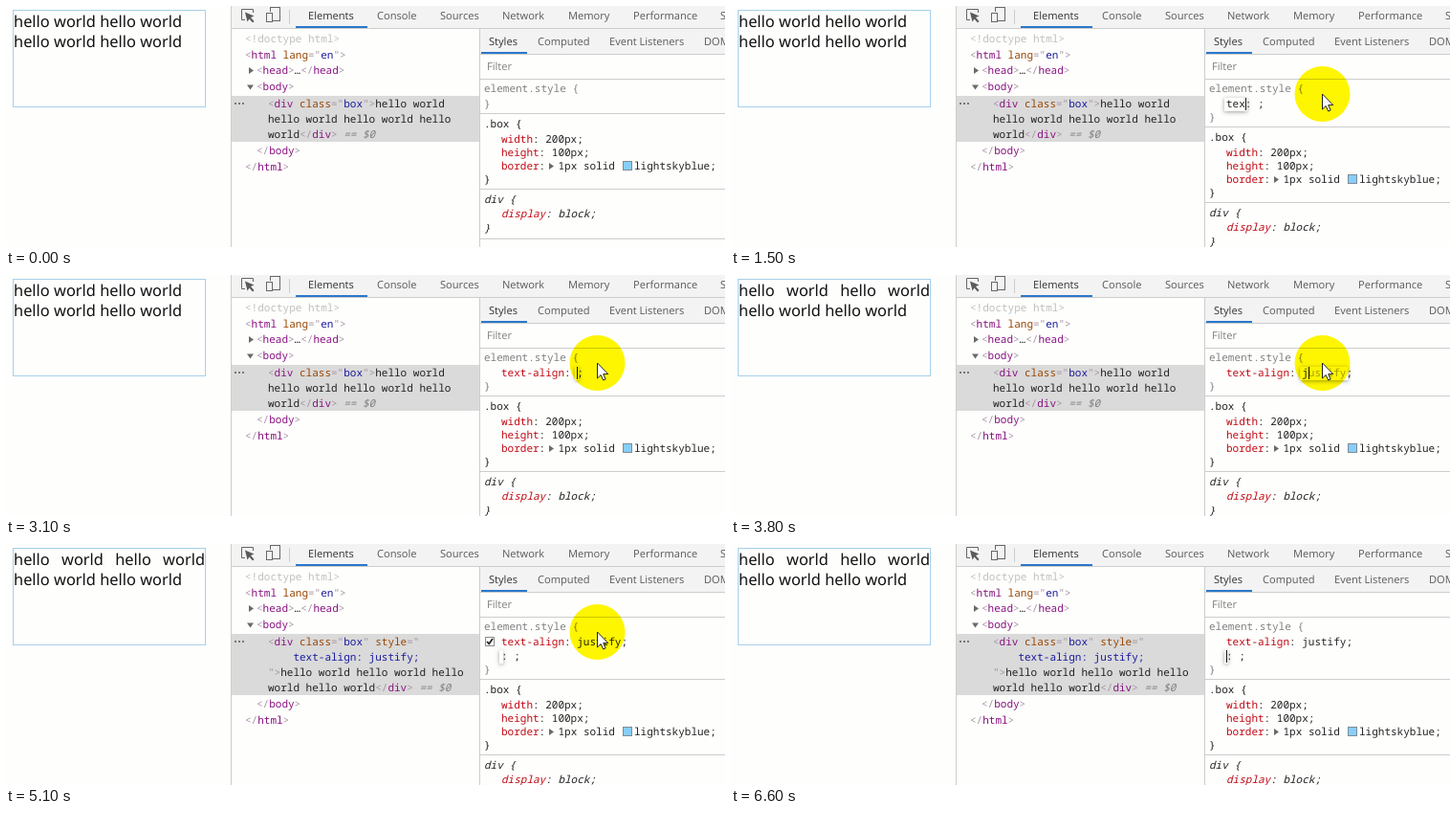
Write an HTML page with a canvas that moves like this. It is 752 by 252 pixels and loops after 7000 ms.

```html
<!DOCTYPE html>
<html lang="en">
<head>
<meta charset="utf-8">
<title>text-align in the inspector</title>
<style>
html, body { margin: 0; width: 100%; height: 100%; overflow: hidden; background: #fefefd; }
canvas { display: block; }
</style>
</head>
<body>
<canvas id="stage" width="752" height="252"></canvas>
<script>
const ctx = document.getElementById('stage').getContext('2d');
const LOOP = 7000, STEP = 100;
const MONO = '11px "Noto Sans Mono", monospace';
const UI = '11.1px "Open Sans", sans-serif';
const PAGE = '16.4px "Noto Sans", sans-serif';
const PAPER = '#fefefd', BAR = '#f3f3f3', LINE = '#cdcdcd', BLUE = '#2a78cc';

// Colours for the ^x marks inside code text
const INK = {
  k: '#222222', g: '#c0c0c0', s: '#808080', b: '#a894a6', t: '#881280',
  a: '#994500', v: '#1a1aa0', p: '#c00a14', h: '#a4a49a'
};

const clamp = v => Math.max(0, Math.min(1, v));
const mix = (a, b, k) => a + (b - a) * k;

function rect(x, y, w, h, color) {
  ctx.fillStyle = color;
  ctx.fillRect(x, y, w, h);
}

function frame(x, y, w, h, color) {
  ctx.strokeStyle = color;
  ctx.lineWidth = 1;
  ctx.strokeRect(x + .5, y + .5, w - 1, h - 1);
}

function poly(points, fill, stroke, close = true) {
  ctx.beginPath();
  points.forEach(([x, y]) => ctx.lineTo(x, y));
  if (close) ctx.closePath();
  if (fill) { ctx.fillStyle = fill; ctx.fill(); }
  if (stroke) { ctx.strokeStyle = stroke; ctx.stroke(); }
}

function label(text, x, y, color = '#5a5a5a', font = UI) {
  ctx.font = font;
  ctx.fillStyle = color;
  ctx.fillText(text, x, y);
}

// Monospaced text; "^x" switches to the colour INK.x
function code(x, y, text, italic) {
  ctx.font = (italic ? 'italic ' : '') + MONO;
  ('^k' + text).split('^').slice(1).forEach(part => {
    const run = part.slice(1);
    ctx.fillStyle = INK[part[0]];
    ctx.fillText(run, x, y);
    x += ctx.measureText(run).width;
  });
  return x;
}

function arrowRight(x, y) { poly([[x, y - 3.5], [x + 5, y], [x, y + 3.5]], '#6a6a6a'); }
function arrowDown(x, y) { poly([[x, y - 2.5], [x + 7, y - 2.5], [x + 3.5, y + 2.5]], '#6a6a6a'); }

function drawPage(justified) {
  frame(7, 4, 202, 102, '#a6d0ea');
  const words = ['hello', 'world', 'hello', 'world'];
  ctx.font = PAGE;
  const widths = words.map(w => ctx.measureText(w).width);
  const space = ctx.measureText(' ').width;
  const slack = (200 - widths.reduce((a, b) => a + b)) / 3;
  [[22, justified ? slack : space], [43, space]].forEach(([y, gap]) => {
    let x = 8;
    words.forEach((w, i) => {
      label(w, x, y, '#111', PAGE);
      x += widths[i] + gap;
    });
  });
}

function drawToolbar() {
  rect(236, 0, 516, 23, BAR);
  rect(236, 23, 516, 1, LINE);
  poly([[250, 14.5], [246.5, 14.5], [246.5, 3.5], [258.5, 3.5], [258.5, 7]], null, '#666', false);
  poly([[250, 6.5], [259.5, 10.5], [256, 12], [259.5, 16], [258, 17.5], [254.5, 13.5], [252.5, 16.5]], '#5a5a5a');
  frame(276, 1, 11, 15, '#666');
  rect(271, 6, 8, 11, BAR);
  frame(272, 7, 7, 10, '#666');
  rect(296, 4, 1, 15, LINE);
  label('Elements', 316, 14, '#333');
  [['Console', 388], ['Sources', 454], ['Network', 519], ['Memory', 588],
    ['Performance', 656], ['Security', 747]].forEach(([name, x]) => label(name, x, 14));
  rect(303, 21, 75, 2, BLUE);
}

function drawTree(styled, flash) {
  const rows = styled ? 4 : 3;
  rect(236, 94, 259, rows * 16, '#dadada');
  code(250, 38, '^g<!doctype html>');
  code(250, 55, '^b<^thtml ^alang^b="^ven^b">');
  arrowRight(254, 67.5);
  code(262, 71, '^b<^thead^b>^k…^b</^thead^b>');
  arrowDown(252, 85);
  code(262, 88, '^b<^tbody^b>');
  [239, 243, 247].forEach(x => rect(x, 101, 2, 2, '#777'));
  const tail = '^b</^tdiv^b>';
  let end;
  if (styled) {
    code(274, 106, '^b<^tdiv ^aclass^b="^vbox^b" ^astyle^b="');
    rect(274, 111, 158, 15, `rgba(255,165,245,${1 - flash * flash})`);
    ctx.globalAlpha = flash * flash;
    code(300.4, 122, '^vtext-align: justify;');
    ctx.globalAlpha = 1;
    code(274, 138, '^b">^khello world hello world hello');
    end = code(274, 154, 'world hello world' + tail);
  } else {
    code(274, 106, '^b<^tdiv ^aclass^b="^vbox^b">^khello world');
    code(274, 122, 'hello world hello world hello');
    end = code(274, 138, 'world' + tail);
  }
  code(end, 90 + rows * 16, '^s == $0', true);
  const y = 107 + rows * 16;
  code(262, y, '^b</^tbody^b>');
  code(250, y + 17, '^b</^thtml^b>');
}

function checkbox(y) {
  rect(501, y - 9, 10, 10, '#fff');
  frame(501, y - 9, 10, 10, '#8a8a8a');
  ctx.lineWidth = 1.8;
  poly([[503, y - 4], [505.2, y - 1.6], [509, y - 7]], null, '#222', false);
}

function editBox(x, y, w) {
  ctx.save();
  ctx.shadowColor = 'rgba(80,80,80,.55)';
  ctx.shadowBlur = 4;
  ctx.shadowOffsetY = 1;
  rect(x - 2, y - 10, w + 4, 14, PAPER);
  ctx.restore();
}

const caret = (x, y) => rect(Math.round(x), y - 10, 1, 13, '#111');

function typedName(t) {
  if (t >= 2300) return 'text-align';
  if (t >= 2200) return 'text-al';
  return 'text-a'.slice(0, clamp((t - 1200) / 600) * 6);
}

function drawEditing(t) {
  const cell = 6.6, x = 518, y = 106, valueX = x + 12 * cell;
  if (t < 1200) return;
  if (t < 3000) {
    const name = typedName(t), end = x + name.length * cell;
    editBox(x, y, name.length * cell);
    code(x, y, name + ': ;');
    if (t > 1200 && t < 2800) caret(end, y);
  } else if (t < 3800) {
    code(x, y, '^ptext-align^k:');
    editBox(valueX, y, 0);
    code(valueX, y, ';');
    if (t < 3500) caret(valueX, y);
  } else if (t < 4400) {
    const typed = (t - 3700) / 100;
    code(x, y, '^ptext-align^k:');
    editBox(valueX, y, 7 * cell);
    code(valueX, y, 'justify'.slice(0, typed) + '^h' + 'justify'.slice(typed) + '^k;');
    caret(valueX + typed * cell, y);
  } else {
    code(x, y, '^ptext-align^k: justify;');
    editBox(x, y + 15, 0);
    code(x, y + 15, ': ;');
    const on = t < 5000 || (t >= 5500 && t < 6000) || t >= 6500;
    if (on) caret(x, y + 15);
  }
}

function drawStyles(t, mouse) {
  rect(495, 24, 1, 228, LINE);
  rect(496, 24, 256, 26, BAR);
  rect(496, 50, 256, 1, LINE);
  label('Styles', 505, 41, '#333');
  [['Computed', 556], ['Event Listeners', 631], ['DOM Breakpoints', 730]]
    .forEach(([name, x]) => label(name, x, 41));
  rect(497, 48, 48, 2, BLUE);
  label('Filter', 503, 67, '#808080');
  rect(496, 76, 256, 1, LINE);

  const extra = t < 1200 ? 0 : t < 4400 ? 1 : 2;
  const dy = Math.round(extra * 14.4);
  const boxTop = 112 + dy, divTop = 191 + dy;
  code(500, 90, '^selement.style {');
  code(500, 106 + dy, '^s}');
  drawEditing(t);
  if (extra === 2 && mouse && mouse.y < boxTop) checkbox(106);

  rect(496, boxTop, 256, 1, LINE);
  code(500, 127 + dy, '.box {');
  code(518, 143 + dy, '^pwidth^k: 200px;');
  code(518, 157 + dy, '^pheight^k: 100px;');
  code(518, 171 + dy, '^pborder^k:');
  arrowRight(568, 167.5 + dy);
  code(577.5, 171 + dy, '1px solid');
  rect(645, 162 + dy, 10, 10, '#87cefa');
  frame(645, 162 + dy, 10, 10, '#7f8c94');
  code(657, 171 + dy, 'lightskyblue;');
  code(500, 185 + dy, '}');
  if (mouse && mouse.y > boxTop && mouse.y < divTop)
    [143, 157, 171].forEach(y => checkbox(y + dy));

  rect(496, divTop, 256, 1, LINE);
  code(500, 206 + dy, 'div {', true);
  code(518, 221 + dy, '^pdisplay^k: block;', true);
  code(500, 236 + dy, '}', true);
  rect(496, 243 + dy, 256, 1, LINE);
}

function mouseAt(t) {
  if (t < 100 || t >= 6600) return null;
  const enter = 1 - Math.pow(1 - clamp((t - 50) / 750), 2);
  const leave = clamp((t - 6100) / 400);
  return {
    x: mix(725, 618.5, enter) + 4 * leave,
    y: mix(262, 92, enter) + 96 * leave * leave
  };
}

function drawMouse({ x, y }) {
  ctx.globalCompositeOperation = 'multiply';
  ctx.fillStyle = '#fff600';
  ctx.beginPath();
  ctx.arc(x, y, 29, 0, 7);
  ctx.fill();
  ctx.globalCompositeOperation = 'source-over';
  ctx.lineWidth = 1;
  poly([[0, 0], [0, 16], [3.7, 12.5], [6.2, 18], [8.6, 17], [6.2, 11.6], [11.3, 11.6]]
    .map(([px, py]) => [x + px, y + py]), '#fff', '#222');
}

function draw(now) {
  const t = Math.floor(now % LOOP / STEP) * STEP;
  const mouse = mouseAt(t);
  ctx.textRendering = 'geometricPrecision';
  ctx.lineWidth = 1;
  rect(0, 0, 752, 252, PAPER);
  drawPage(t >= 3800);
  rect(235, 0, 1, 252, LINE);
  drawToolbar();
  drawTree(t >= 3900, clamp((t - 3900) / 1200));
  drawStyles(t, mouse);
  if (mouse) drawMouse(mouse);
}

const start = performance.now();
(function tick() {
  draw(performance.now() - start);
  requestAnimationFrame(tick);
})();
</script>
</body>
</html>
```
